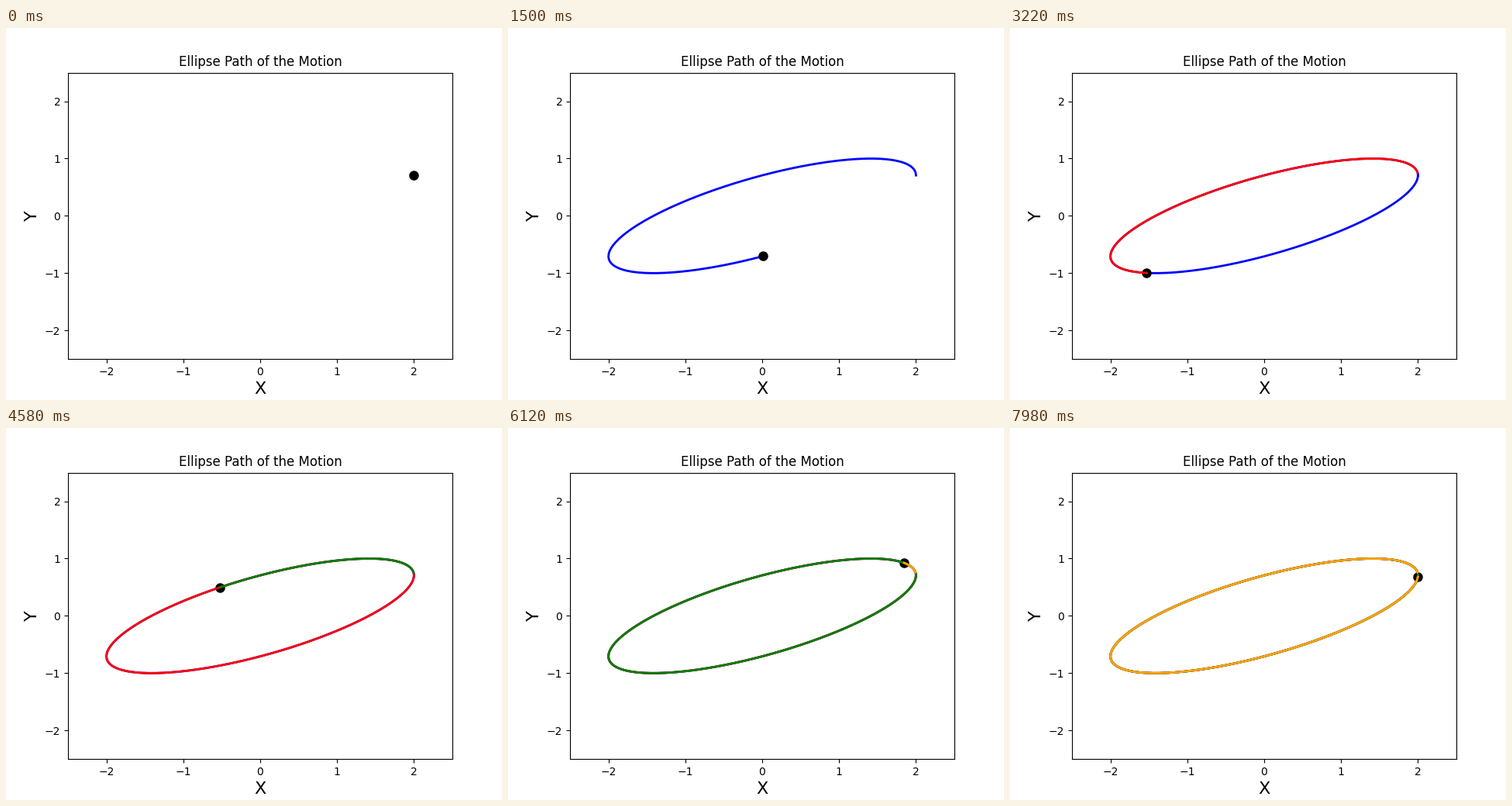
Animation of 640x480 px, one loop 8 s. Source, as a matplotlib script:

```python
import numpy as np
import matplotlib.pyplot as plt
from matplotlib.animation import FuncAnimation

FRAMES = 400
LAP = 100  # frames per coloured lap

t = np.linspace(0, 20, 1000)
x = 2 * np.cos(np.pi * t)
y = np.sin(np.pi * t + np.pi / 4)

fig, ax = plt.subplots(figsize=(6.4, 4.8), dpi=100)
ax.set(xlim=(-2.5, 2.5), ylim=(-2.5, 2.5))
ax.set_title("Ellipse Path of the Motion")
ax.set_xlabel("X", fontsize=16)
ax.set_ylabel("Y", fontsize=16)


def trail(color):
    return ax.plot([], [], color=color, lw=2)[0]


# The dot sits above the first lap and below the later ones.
first = trail("blue")
dot, = ax.plot([], [], "o", color="black", markersize=8)
trails = [first] + [trail(c) for c in ("red", "green", "orange")]


def update(i):
    for lap, line in enumerate(trails):
        start = lap * LAP + 1 if lap else 0
        stop = max(start, min(i, (lap + 1) * LAP) + 1)
        line.set_data(x[start:stop], y[start:stop])
    dot.set_data([x[i]], [y[i]])
    return [*trails, dot]


anim = FuncAnimation(fig, update, frames=FRAMES, interval=20, repeat=True,
                     repeat_delay=0, blit=False)
plt.show()
```
